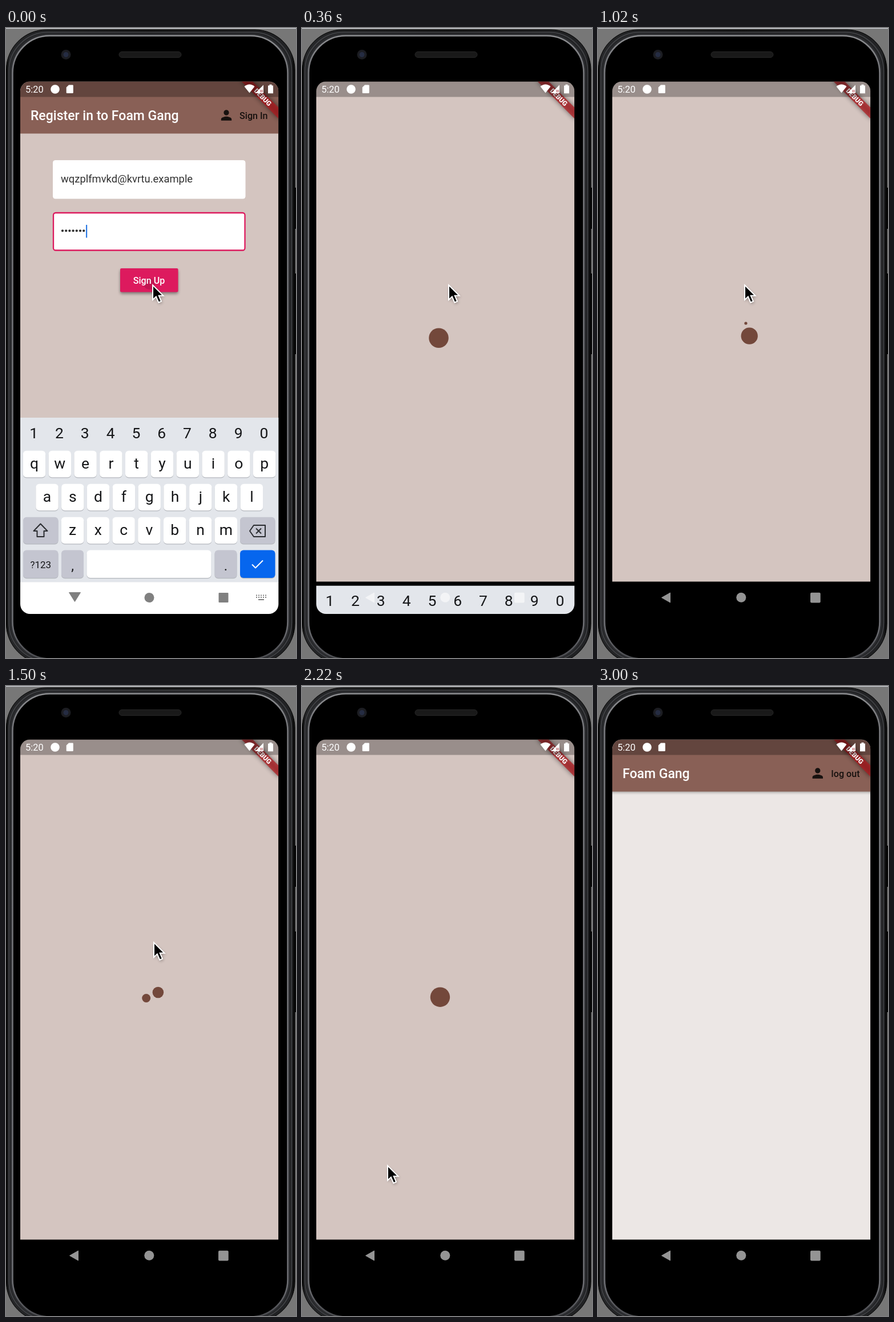
Animation, 508 px wide and 1101 px high, one loop 3060 ms. Source, as an HTML page:

```html
<!DOCTYPE html>
<html lang="en">
<head>
<meta charset="utf-8">
<title>Sign up flow</title>
<style>
  html, body { margin: 0; width: 100%; height: 100%; overflow: hidden; background: #777; }
  svg { display: block; width: 508px; height: 1101px; font-family: Roboto, "Noto Sans", sans-serif; }
  .mid { text-anchor: middle; }
  .med { font-weight: 500; }
</style>
</head>
<body>
<svg viewBox="0 0 508 1101">
  <defs>
    <linearGradient id="rim" x1="0" y1="0" x2="0" y2="1">
      <stop offset="0" stop-color="#8d8e91"/>
      <stop offset=".04" stop-color="#77787c"/>
      <stop offset=".95" stop-color="#6c6d72"/>
      <stop offset="1" stop-color="#4a4b4f"/>
    </linearGradient>
    <linearGradient id="shell">
      <stop offset="0" stop-color="#050505"/>
      <stop offset=".01" stop-color="#262729"/>
      <stop offset=".5" stop-color="#151515"/>
      <stop offset=".985" stop-color="#222325"/>
      <stop offset="1" stop-color="#050505"/>
    </linearGradient>
    <clipPath id="screen"><rect x="25" y="93.500" width="452.300" height="930.500" rx="17"/></clipPath>
    <clipPath id="page"><rect x="25" y="93.500" width="452.300" height="874"/></clipPath>
    <clipPath id="btnClip"><rect x="200" y="420" width="101.500" height="41.500" rx="2.300"/></clipPath>
    <filter id="soft" x="-30%" y="-50%" width="160%" height="220%"><feGaussianBlur stdDeviation="2.4"/></filter>
    <filter id="haze" x="-30%" y="-150%" width="160%" height="400%"><feGaussianBlur stdDeviation="3.9"/></filter>
    <path id="person" transform="scale(1.151)" d="M12 12c2.210 0 4-1.790 4-4s-1.790-4-4-4-4 1.790-4 4 1.790 4 4 4zm0 2c-2.670 0-8 1.340-8 4v2h16v-2c0-2.660-5.330-4-8-4z" fill="#17110f"/>
  </defs>

  <!-- phone body -->
  <rect width="508" height="1101" fill="#777"/>
  <rect width="508" height="1.2" fill="#d3d5db"/>
  <rect x="504" y="279" width="4" height="72" fill="#0b0b0b"/>
  <rect x="504" y="429" width="4" height="141" fill="#0b0b0b"/>
  <rect x=".5" y="3" width="505.500" height="1108" rx="70" fill="url(#shell)" stroke="#000"/>
  <g fill="none">
    <rect x="5" y="7.500" width="495.500" height="1099" rx="68" stroke="#45464a" stroke-width="1.500"/>
    <rect x="10" y="12" width="485" height="1092" rx="66" stroke="#2c2d30" stroke-width="5"/>
    <rect x="11.500" y="13.500" width="482" height="1089" rx="65" fill="#000" stroke="url(#rim)" stroke-width="2.600"/>
  </g>
  <rect x="198" y="41.500" width="109" height="10" rx="5" fill="#191919" stroke="#272727"/>
  <circle cx="105" cy="46.500" r="8.500" fill="#1c1d22"/>
  <circle cx="105" cy="46.500" r="4.500" fill="#252c42"/>

  <g clip-path="url(#screen)">
    <g clip-path="url(#page)">
      <rect id="back" x="25" y="93" width="453" height="875" fill="#d4c5c0"/>

      <g id="loading" fill="#73483b">
        <circle id="dotA"/><circle id="dotB"/>
      </g>

      <g id="bar">
        <rect id="barShade" x="22" y="120" width="459" height="66" fill="#000" opacity=".32" filter="url(#soft)"/>
        <rect x="25" y="93" width="453" height="91.500" fill="#896056"/>
        <text id="title" class="med" x="43" y="161" font-size="23" fill="#fff"></text>
        <use id="user" href="#person" y="138.700"/>
        <text id="action" class="med" x="458.500" y="158.500" font-size="16.100" text-anchor="end" fill="#17110f"></text>
      </g>

      <g id="form">
        <rect x="82" y="231" width="337.500" height="67.500" rx="4.600" fill="#fff"/>
        <text x="96" y="269.800" font-size="18.400" fill="#303030">wqzplfmvkd@kvrtu.example</text>
        <rect x="83" y="323" width="335.500" height="65.500" rx="4" fill="#fff" stroke="#dd1a5e" stroke-width="2.300"/>
        <g id="secret" fill="#303030"></g>
        <rect x="140" y="344" width="2.200" height="22.500" fill="#2d7be5"/>
        <rect x="200" y="423" width="101.500" height="41.500" rx="3" opacity=".4" filter="url(#soft)"/>
        <rect x="200" y="420" width="101.500" height="41.500" rx="2.300" fill="#dd1a5e"/>
        <circle id="ripple" cx="251" cy="447" fill="#7a0a35" opacity=".28" clip-path="url(#btnClip)"/>
        <text class="mid med" x="250.500" y="446.600" font-size="16.100" fill="#fff">Sign Up</text>
      </g>

      <g transform="translate(477.5 93.3) rotate(45) scale(1.151)">
        <rect x="-40" y="28" width="80" height="12" opacity=".5" filter="url(#haze)"/>
        <rect x="-40" y="28" width="80" height="12" fill="#b5181d" opacity=".7"/>
        <text class="mid" y="37.600" font-size="10.200" font-weight="900" fill="#fff">DEBUG</text>
      </g>

      <!-- status bar -->
      <rect x="25" y="93" width="453" height="27.500" opacity=".28"/>
      <g fill="#fff">
        <text x="34" y="112.800" font-size="16.400">5:20</text>
        <circle cx="86" cy="107" r="7.800"/>
        <path d="M110 99.500h6.500q1.300 0 1.300 1.300v12q0 1.300-1.300 1.300h-9.500q-1.300 0-1.300-1.300v-9z"/>
        <path d="M426.500 113.500L417.500 102.300q9-7.500 18 0z"/>
        <path d="M451 99.500v14.500h-14.500z"/>
        <path d="M461.500 100.500v-1.700h4v1.700h2.500v13.700h-9v-13.700z"/>
      </g>
      <path d="M446.500 108v4.500M449 108v4.500" stroke="#a8343a" stroke-width="1"/>
    </g>

    <g id="keyboard">
      <rect x="25" y="681" width="453" height="288" fill="#e3e6eb"/>
      <rect x="25" y="968.500" width="453" height="56" fill="#fff"/>
      <g id="keys"></g>
      <g fill="none" stroke="#2b2d31" stroke-width="2" stroke-linejoin="round">
        <path d="M60.500 866.500l-12 12.500h6v10h12v-10h6z"/>
        <path d="M434 869h20v20h-20l-7-10zM438 874.500l9 9M447 874.500l-9 9"/>
        <path d="M431 937.500l6 6 13-13" stroke="#fff"/>
      </g>
    </g>

    <g id="navTyping" fill="#808080">
      <path d="M110.500 986.500h20l-10 16z" stroke="#808080" stroke-linejoin="round"/>
      <circle cx="251" cy="995.500" r="8.500"/>
      <rect x="372.500" y="987" width="17" height="17" rx="1"/>
      <path d="M438 991.500h18M438 995h18" stroke="#808080" stroke-width="2" stroke-dasharray="2 2"/>
      <path d="M442 999h10" stroke="#808080" stroke-width="2"/>
    </g>
    <g id="nav" fill="#fff" opacity=".58">
      <path d="M111.500 995.500l15-8.500v17z" stroke="#fff" stroke-linejoin="round"/>
      <circle cx="250.800" cy="995.300" r="8.500"/>
      <rect x="372" y="986.700" width="17.700" height="17.700" rx="2"/>
    </g>
  </g>

  <g id="pointer">
    <g transform="translate(1 2.4)">
      <path d="M1 3v25l6-5 4 10 6-2.500-4-9.500h8z" opacity=".3" filter="url(#soft)"/>
      <path d="M0 0v25.500l5.900-5.500 4.400 10.300 4.700-2-4.300-10h7.800z" fill="#000" stroke="#fff" stroke-width="2"/>
    </g>
  </g>
</svg>

<script>
const $ = id => document.getElementById(id);
const LOOP = 3060, STEP = 60;
const LOAD_AT = 240, HOME_AT = 2880, POINTER_OFF = 2460;

function add(parent, tag, attrs, text) {
  const el = document.createElementNS("http://www.w3.org/2000/svg", tag);
  for (const k in attrs) el.setAttribute(k, attrs[k]);
  if (text) el.textContent = text;
  parent.append(el);
}
const set = (id, attrs) => { for (const k in attrs) $(id).setAttribute(k, attrs[k]); };
const show = (id, on) => set(id, { visibility: on ? "visible" : "hidden" });

// Keyboard
function key(x, y, w, fill, label, size = 26.5, base = 31.5) {
  const box = { x, y, width: w, height: y > 910 ? 48.5 : 46.5, rx: 6 };
  add($("keys"), "rect", { ...box, y: y + 1.2, fill: "#b4b7bd" });
  add($("keys"), "rect", { ...box, fill });
  if (label) add($("keys"), "text", { x: x + w / 2, y: y + base, class: "mid", "font-size": size, fill: "#151618" }, label);
}
const PITCH = 44.8, GREY = "#c4c5d0";
[..."1234567890"].forEach((c, i) =>
  add($("keys"), "text", { x: 48.7 + i * PITCH, y: 716.7, class: "mid", "font-size": 26.5, fill: "#151618" }, c));
[["qwertyuiop", 49.5, 738.7], ["asdfghjkl", 72, 796.7], ["zxcvbnm", 116.5, 854.7]].forEach(([row, x, y]) =>
  [...row].forEach((c, i) => key(x + i * PITCH - 19.7, y, 39.4, "#fff", c)));
key(30, 854.7, 61.5, GREY);
key(410, 854.7, 61.5, GREY);
key(30, 912.5, 61.5, GREY, "?123", 17, 31);
key(97, 912.5, 39, GREY, ",", 24, 35);
key(141.5, 912.5, 218, "#fff");
key(365.5, 912.5, 39, GREY, ".", 24, 35);
key(410, 912.5, 61.5, "#0666ee");
for (let i = 0; i < 7; i++) add($("secret"), "circle", { cx: 99 + i * 6.2, cy: 354.3, r: 2.1 });

// Piecewise linear value from [time, ...values] rows
function track(rows, t, n = 1) {
  let i = 0;
  while (i < rows.length - 2 && t >= rows[i + 1][0]) i++;
  const a = rows[i], b = rows[i + 1];
  const f = Math.min(1, Math.max(0, (t - a[0]) / (b[0] - a[0])));
  return a[n] + (b[n] - a[n]) * f;
}
const turns = [[360, 0], [420, .14], [540, .25], [1020, .456], [1500, .678], [2220, .969], [2760, 1.198], [3060, 1.325]];
const slide = [[240, 0], [300, 120], [360, 293.7], [420, 345]];
const mouse = [[1260, 256, 447], [1380, 258, 446], [1680, 258, 446], [1800, 253, 510], [1980, 222, 710],
  [2100, 196, 815], [2160, 183, 836], [2220, 149, 836], [2340, 101, 852]];

// Cubic bezier (.42, 0, .58, 1)
function easeInOut(x) {
  let lo = 0, hi = 1, s = .5;
  for (let i = 0; i < 24; i++) {
    s = (lo + hi) / 2;
    const u = 1 - s;
    if (3 * u * u * s * .42 + 3 * u * s * s * .58 + s ** 3 < x) lo = s; else hi = s;
  }
  return s * s * (3 - 2 * s);
}

// Two dots turn about the centre and swap sizes
const SIZE = 57.55;
function spin(p) {
  const grow = Math.abs(2 * easeInOut(p > 1 ? 2 - p : p) - 1);
  const dot = (id, deg, scale) => {
    const a = (deg / 360 + p) * 2 * Math.PI, d = SIZE * .2 * Math.SQRT2;
    set(id, { cx: 251 + d * Math.cos(a), cy: 530.2 + d * Math.sin(a), r: SIZE * .3 * scale });
  };
  dot("dotA", 225, 1 - grow);
  dot("dotB", 135, grow);
}

function draw(t) {
  const form = t < LOAD_AT, home = t >= HOME_AT;
  show("form", form);
  show("bar", form || home);
  set("barShade", { opacity: home ? .32 : 0 });
  show("loading", !form && !home);
  set("back", { fill: home ? "#ece7e5" : "#d4c5c0" });
  $("title").textContent = form ? "Register in to Foam Gang" : "Foam Gang";
  $("action").textContent = form ? "Sign In" : "log out";
  set("user", { x: form ? 372.2 : 371 });
  set("ripple", { r: 10 + t * .2 });

  const drop = track(slide, t);
  show("keyboard", drop < 343);
  set("keyboard", { transform: `translate(0 ${drop})` });
  show("navTyping", form);
  show("nav", !form);

  spin(track(turns, t));
  show("pointer", t < POINTER_OFF);
  set("pointer", { transform: `translate(${track(mouse, t)} ${track(mouse, t, 2)})` });
}

const start = performance.now();
function tick() {
  const t = (performance.now() - start) % LOOP;
  draw(Math.floor(t / STEP) * STEP);
  requestAnimationFrame(tick);
}
tick();
</script>
</body>
</html>
```
